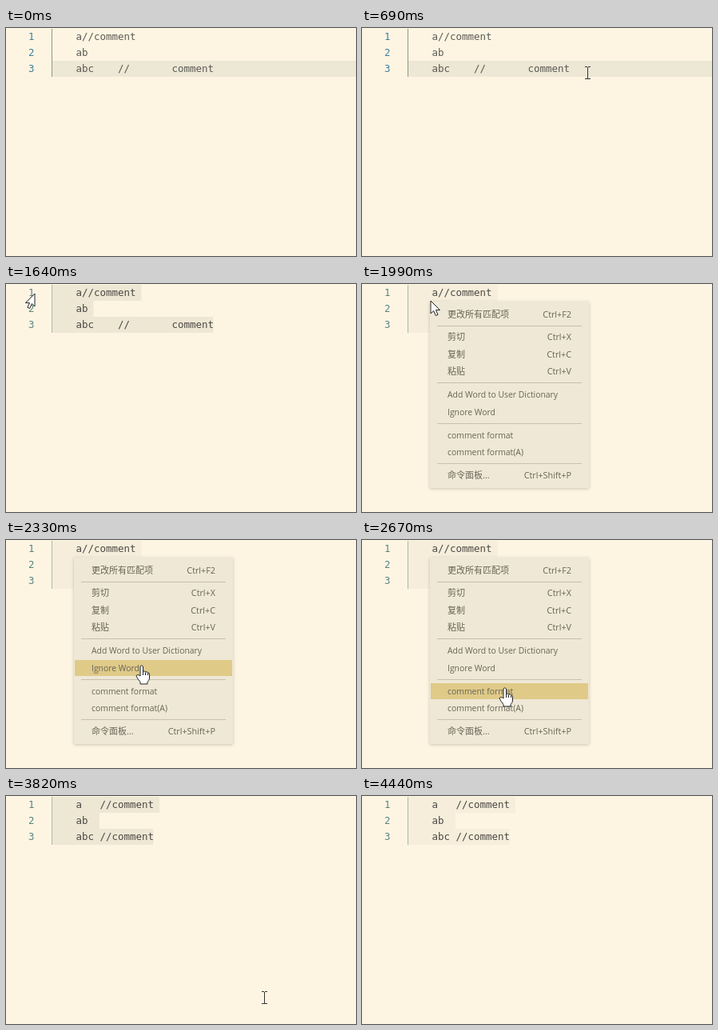
An HTML page with a canvas that plays this animation: 438 px wide and 285 px high, repeating every 4.51 s.

```html
<!DOCTYPE html>
<html>
<head>
<meta charset="utf-8">
<style>
  html, body { margin: 0; width: 100%; height: 100%; overflow: hidden; background: #fdf5e2; }
  canvas { display: block; }
</style>
</head>
<body>
<canvas id="stage" width="438" height="285"></canvas>
<script>
const ctx = document.getElementById('stage').getContext('2d');
const LOOP = 4510, TICK = LOOP / 66;
const LEFT = 57, CHAR = 7.5, ROW = 20;
const CODE = '12.46px "DejaVu Sans Mono", "Noto Sans Mono", monospace';
const UI = '"Open Sans", "Noto Sans CJK SC", "Noto Sans CJK", sans-serif';

const before = ['    a//comment', '    ab', '    abc    //       comment'];
const after = ['    a   //comment', '    ab ', '    abc //comment'];

// label, shortcut, centre y
const items = [
  ['更改所有匹配项', 'Ctrl+F2', 38], ['剪切', 'Ctrl+X', 66], ['复制', 'Ctrl+C', 88],
  ['粘贴', 'Ctrl+V', 109], ['Add Word to User Dictionary', '', 138],
  ['Ignore Word', '', 160], ['comment format', '', 189],
  ['comment format(A)', '', 210], ['命令面板...', 'Ctrl+Shift+P', 239]
];
const separators = [52, 123, 174, 224];

// Pointer paths: [tick, x, y]; the pointer is hidden between paths.
const paths = [
  [[1, 399, 281], [2, 348, 199], [3, 317, 131], [4, 300, 89], [5, 289, 66], [8, 285, 58],
   [10, 282, 56], [16, 20, 12], [17, 8, 3]],
  [[21, 4, 9], [28, 78, 17]],
  [[29, 86, 21], [34, 170, 157], [36, 171, 173], [38, 178, 184], [41, 180, 187],
   [50, 180, 187], [58, 371, 273], [59, 381, 280]]
];

const arrow = new Path2D('M0 0V16L3.7 12.6L6.3 18.5L9 17.4L6.5 11.6H11.5Z');
const hand = new Path2D('M-2 13V1Q-.5 -1.5 1.5 1V7.5Q3 6 5 8Q6.5 7 7.5 9Q9.5 8.5 9.5 11V16Q9 19 7 20.5V23H-2V20.5Q-5 17 -7 13Q-6 10 -2 13Z');
const fingers = new Path2D('M1.5 7V12M4.5 8.5V12M7.5 9.5V12');

function rect(x, y, w, h, color) {
  ctx.fillStyle = color;
  ctx.fillRect(x, y, w, h);
}

function text(str, x, y, font, color, align = 'left') {
  ctx.font = font;
  ctx.fillStyle = color;
  ctx.textAlign = align;
  ctx.fillText(str, x, y);
}

function pointerAt(tick) {
  const path = paths.find(p => tick >= p[0][0] && tick <= p[p.length - 1][0]);
  if (!path) return null;
  const i = Math.max(1, path.findIndex(k => k[0] >= tick));
  const [t0, x0, y0] = path[i - 1], [t1, x1, y1] = path[i];
  const f = (tick - t0) / (t1 - t0);
  return { x: Math.round(x0 + (x1 - x0) * f), y: Math.round(y0 + (y1 - y0) * f) };
}

// Start of the selection, which always runs to the end of the last line.
function caretAt(tick, pointer, lines) {
  if (tick <= 10) return null;
  if (tick >= 16) return { row: 0, col: 0 };
  const row = Math.min(2, Math.max(0, Math.floor((pointer.y - 1) / ROW)));
  const col = Math.round((pointer.x - LEFT) / CHAR);
  return { row, col: Math.min(lines[row].length, Math.max(0, col)) };
}

function drawEditor(tick, pointer) {
  const lines = tick < 47 ? before : after;
  const caret = caretAt(tick, pointer, lines);
  const blurred = (tick >= 28 && tick < 47) || tick >= 65;
  const caretOn = caret && !blurred && !(tick >= 24 && tick < 28) && !(tick >= 55 && tick < 62);

  if (!caret) rect(LEFT, 41, 381, ROW, '#ede7d5');
  lines.forEach((line, row) => {
    const top = 1 + row * ROW;
    if (caret && row >= caret.row) {
      const from = row === caret.row ? caret.col : 0;
      const to = line.length + (row < 2 ? 1 : 0);
      rect(LEFT + from * CHAR, top, (to - from) * CHAR, ROW, blurred ? '#f6eedb' : '#eee7d4');
    }
    rect(LEFT, top, 1, ROW, caret ? '#b0b5ac' : '#96948a');
    text(row + 1, 35.5, top + 14, CODE, caret ? '#5a8683' : '#3f809c', 'right');
    text(line, LEFT + .5, top + 14, CODE, caret ? '#4b4843' : '#595952');
  });
  if (caretOn) rect(Math.round(LEFT + caret.col * CHAR), 1 + caret.row * ROW, 1, ROW, '#55524a');
}

function drawMenu(pointer) {
  ctx.save();
  ctx.shadowColor = 'rgba(90, 80, 50, .3)';
  ctx.shadowBlur = 4;
  ctx.shadowOffsetY = 1;
  rect(85, 22, 199, 233, '#efe8d6');
  ctx.restore();
  for (const y of separators) rect(94, y, 181, 1, '#c7c0b0');
  for (const [label, keys, y] of items) {
    if (pointer.y > 25 && Math.abs(pointer.y - y) <= 10) rect(86, y - 10, 197, 20, '#dfca88');
    const size = label.charCodeAt(0) > 255 ? 11 : 10.4;
    text(label, 107, y + 4, size + 'px ' + UI, '#686458');
    text(keys, 262, y + 4, '10.8px ' + UI, '#686458', 'right');
  }
}

function drawShape(shape) {
  ctx.fillStyle = '#fff';
  ctx.strokeStyle = '#222';
  ctx.lineWidth = 1;
  ctx.fill(shape);
  ctx.stroke(shape);
}

function drawPointer({ x, y }, menuOpen, tick) {
  ctx.save();
  ctx.translate(x, y);
  if (menuOpen && tick > 29) {
    drawShape(hand);
    ctx.stroke(fingers);
  } else if (menuOpen || x < LEFT) {
    if (!menuOpen) ctx.scale(-1, 1);
    drawShape(arrow);
  } else {
    rect(0, -7, 1, 15, '#333');
    for (const top of [-8, 7]) {
      rect(-3, top, 3, 1, '#333');
      rect(1, top, 3, 1, '#333');
    }
  }
  ctx.restore();
}

const start = performance.now();

function draw() {
  const time = (performance.now() - start) % LOOP;
  const tick = Math.floor(time / TICK + .25) % 66;
  const pointer = pointerAt(tick);
  const menuOpen = tick >= 29 && tick < 47;
  rect(0, 0, 438, 285, '#fdf5e2');
  drawEditor(tick, pointer);
  if (menuOpen) drawMenu(pointer);
  if (pointer) drawPointer(pointer, menuOpen, tick);
  requestAnimationFrame(draw);
}
draw();
</script>
</body>
</html>
```
